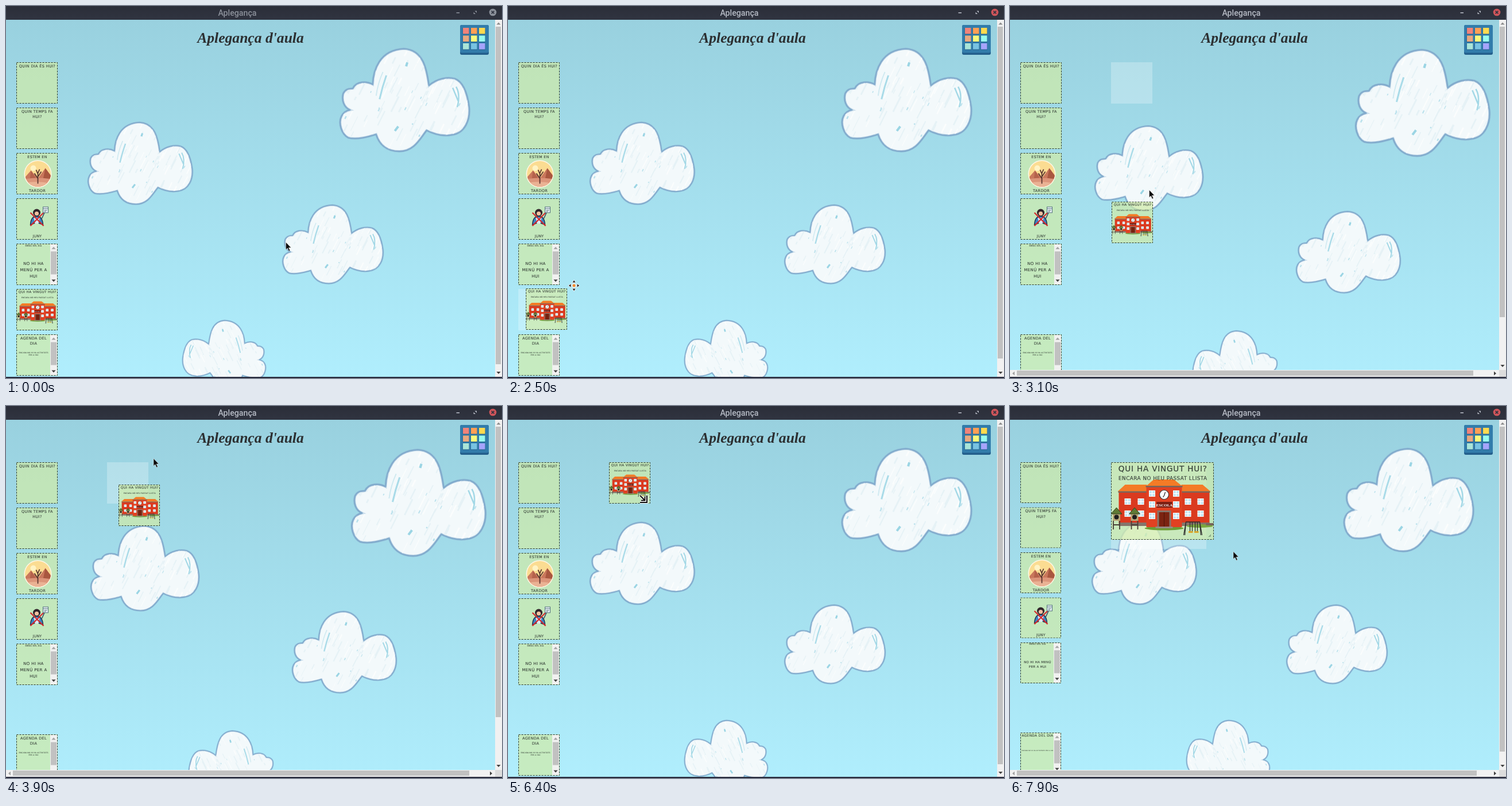
These frames come from a looping animation (864 by 648 pixels, 8000 ms). An HTML page:

```html
<!DOCTYPE html>
<html lang="ca">
<head>
<meta charset="utf-8">
<title>Aplegança</title>
<style>
html, body { margin: 0; width: 100%; height: 100%; overflow: hidden; background: #a6dfee; }
svg { display: block; }
#stage { width: 864px; height: 648px; }
.hand { font-family: "DejaVu Sans", sans-serif; letter-spacing: .06em; fill: #38423a; stroke: #38423a; text-anchor: middle; }
</style>
</head>
<body>
<svg id="stage" viewBox="0 0 864 648"></svg>
<script>
const LOOP = 8000;

// time, x, y, shape
const CURSOR = [
  [0, 487, 411, 'arrow'], [500, 455, 372, 'arrow'], [600, 400, 320, 'arrow'], [700, 330, 288, 'arrow'],
  [800, 262, 296, 'arrow'], [900, 203, 335, 'arrow'], [1000, 169, 392, 'arrow'], [1200, 160, 412, 'arrow'],
  [1300, 140, 450, 'arrow'], [1400, 108, 495, 'arrow'], [1500, 72, 528, 'move'], [1600, 44, 543, 'move'],
  [1700, 42, 541, 'move'], [2200, 64, 524, 'move'], [2300, 92, 502, 'move'], [2500, 115, 487, 'move'],
  [2700, 135, 452, 'arrow'], [2900, 180, 405, 'arrow'], [3000, 215, 362, 'arrow'], [3100, 242, 320, 'arrow'],
  [3300, 254, 255, 'arrow'], [3400, 261, 200, 'arrow'], [3600, 260, 152, 'arrow'], [3700, 259, 112, 'arrow'],
  [3900, 256.5, 91, 'arrow'], [4000, 255, 78, 'arrow'], [4100, 255, 67, 'arrow'], [4300, 255, 64, 'arrow'],
  [4400, 255, 64, 'arrow'], [4800, 246, 95, 'arrow'], [4900, 228, 130, 'arrow'], [5000, 215, 156, 'arrow'],
  [5200, 226, 177, 'arrow'], [5400, 232, 168, 'arrow'], [5500, 240, 156, 'arrow'], [5600, 246, 148, 'arrow'],
  [6400, 229, 155, 'resize'], [7400, 356, 235, 'arrow'], [7700, 382, 249, 'arrow'], [7900, 388.5, 253, 'arrow']
];
// time, x, y of the dragged card
const DRAG = [
  [0, 18, 493], [2500, 31, 492], [2700, 55, 470], [2900, 102, 428], [3000, 143, 383], [3100, 177, 341],
  [3300, 192, 298], [3400, 201, 255], [3600, 199, 205], [3700, 198, 165], [3900, 196, 137], [4000, 196, 123],
  [4100, 196, 111], [4300, 195, 107], [4400, 195, 105], [4600, 179, 99], [4800, 177, 98], [5000, 176, 98]
];
// time, card width, card height, column slot size
const SIZE = [[0, 72, 72, 72], [7400, 155, 120, 71.7], [7700, 174, 131, 71.3], [7900, 179, 135, 71]];
// time, vertical thumb end, horizontal thumb end
const BARS = [
  [0, 624, 0], [2500, 614, 0], [2700, 555, 825], [2900, 542, 807], [4600, 604, 0],
  [4800, 614, 0], [5000, 624, 0], [7400, 602, 835], [7700, 602, 817], [7900, 602, 813]
];
// time, drop hint box
const HINT = [
  [0], [2500, 18, 493, 72, 72], [2700, 97, 98, 72, 72],
  [3000, 176, 98, 72, 72], [4600], [7400, 176, 98, 166, 151]
];

const at = (rows, t) => rows.reduce((hit, row) => row[0] <= t ? row : hit);
const rect = (x, y, w, h, fill, more = '') =>
  `<rect x="${x}" y="${y}" width="${w}" height="${h}" fill="${fill}" ${more}/>`;
const path = (d, fill, more = '') => `<path d="${d}" fill="${fill}" ${more}/>`;
const circle = (x, y, r, fill, more = '') => `<circle cx="${x}" cy="${y}" r="${r}" fill="${fill}" ${more}/>`;
const line = (d, color, w = 1) => path(d, 'none', `stroke="${color}" stroke-width="${w}"`);
const hand = (str, x, y, size) =>
  `<text class="hand" x="${x}" y="${y}" font-size="${size * 0.91}" stroke-width="${size * 0.016}">${str}</text>`;

let seed = 7;
const rnd = () => (seed = seed * 16807 % 2147483647) / 2147483647;

function cloud() {
  const d = 'M57 64C58 40 68 3 112 1C146 3 152 36 156 66C170 54 188 50 202 54C218 60 224 82 227 104' +
    'C229 126 220 150 196 153C180 156 166 152 152 145C140 160 130 182 104 182C80 182 68 168 63 152' +
    'C50 156 30 162 14 158C2 152-4 132 2 120C6 112 12 110 17 109C6 104 2 92 5 80C10 70 18 72 22 71C28 58 46 58 57 64Z';
  let marks = '';
  for (let i = 0; i < 140; i++) {
    const x = rnd() * 235, y = rnd() * 175, n = 6 + rnd() * 22;
    marks += line(`M${x} ${y}l${-n * 0.5} ${n}`, i % 2 ? '#e6f2f6' : '#fbfdfd', 1 + rnd() * 2);
  }
  for (let i = 0; i < 18; i++) {
    const n = 2 + rnd() * 4;
    marks += line(`M${rnd() * 225} ${rnd() * 170}l${-n * 0.5} ${n}`, '#b9e1ec', 1 + rnd() * 1.5);
  }
  marks += line('M81 48Q74 68 69 90', '#a9dbe8', 3) + line('M75 42Q66 62 63 84', '#d0eaf1', 2) +
    line('M204 68Q212 82 206 104M198 70l10 24', '#a3d8e6', 2.5) + line('M118 25l-2 7M102 138l-6 8', '#9bd5e4', 4);
  return `<clipPath id="puff"><path d="${d}"/></clipPath><g id="cloud">` +
    path(d, '#f3f9fb', 'stroke="#8fb4d2" stroke-opacity=".4" stroke-width="4.4"') +
    `<g clip-path="url(#puff)">${marks}</g>` +
    path(d, 'none', 'stroke="#7ba5c9" stroke-opacity=".85" stroke-width="2.6" stroke-linejoin="round"') + '</g>';
}

const pane = (x, y) => rect(x, y, 11, 11, '#fff') + rect(x + 1, y + 1, 9, 9, '#bfe3f4') +
  line(`M${x + 5.5} ${y}v11M${x} ${y + 5.5}h11`, '#fff', 1.3);

function tower(x) {
  return line(`M${x + 3} 73v15M${x + 14} 73v15M${x + 3} 80h11`, '#4a4038', 1.8) +
    rect(x + 2, 60, 13, 13, '#b9a878') + circle(x + 8.5, 66.5, 4, '#1d1d1d') +
    path(`M${x - 1} 61l9.5-11l9.5 11z`, '#5f7a35', 'stroke="#33421f" stroke-width="1"');
}

function school() {
  const wing = x => rect(x, 23, 49, 54, '#da3a1f') + rect(x - 1, 21.5, 51, 2.5, '#77665c') + rect(x, 76, 49, 6, '#85756b');
  let s = path('M11 22L24 10H62V22ZM122 10H159L173 22H122Z', '#f47b26') + wing(13) + wing(122);
  s += '<ellipse cx="92" cy="86" rx="34" ry="3.5" fill="#6c9c35"/><ellipse cx="154" cy="82" rx="23" ry="3" fill="#7aa83f"/>';
  s += rect(61, 13, 62, 71, '#e14122') + path('M60 13L74 1H109L124 13Z', '#f47b26') + rect(60, 12, 64, 2.5, '#77665c');
  for (const y of [34, 55]) for (const x of [23, 46, 128, 150]) s += pane(x, y);
  for (const y of [20, 39, 59]) s += pane(65.5, y) + pane(107.5, y);
  s += circle(92, 27.5, 8, '#fff', 'stroke="#3a3a3a" stroke-width="1.2"') + line('M92 29l2-6M92 29l-2 3', '#222', 1.2);
  s += rect(79, 40, 27, 10, '#7a1e12') +
    '<text x="92.5" y="47.8" font-family="Liberation Serif, serif" font-weight="700" font-size="7" text-anchor="middle" fill="#fff">ESCOLA</text>';
  s += rect(80, 55, 24, 30, '#85756b') + rect(83, 58, 18, 26, '#7b2411') + line('M92 58v26', '#4c1409') + rect(77, 83, 30, 3, '#968a82');
  s += tower(0.5) + tower(32) + rect(165, 77, 13, 4, '#77665c');
  s += line('M126 98l4-23h24l4 23M130 75l-2 23M154 75l2 23M137 75v17M141 75v17M146 75v17M150 75v17', '#2e2e2e', 1.3) +
    rect(134.5, 91, 7.5, 3, '#d9a72b') + rect(144.5, 91, 7.5, 3, '#d9a72b');
  return `<g id="school">${s}</g>`;
}

const autumn = '<g id="autumn"><clipPath id="disc"><circle r="22.5"/></clipPath>' + circle(0, 0, 24, '#fff7e6') +
  '<g clip-path="url(#disc)">' + rect(-24, -24, 48, 48, '#fbdc92') + circle(-8, -10, 5, '#fff3c4') +
  path('M-26 10L-12-6L0 8L13-10L28 10Z', '#c9775c') + path('M13-10L28 10H9Z', '#a9573f') + path('M-12-6L-2 10H-14Z', '#b5624c') +
  path('M-24 9Q0 5 24 9V24H-24Z', '#dc957a') + path('M-24 16Q0 11 24 17V24H-24Z', '#eab294') + '</g>' +
  line('M0 17V-3M0 8L-6-1M0 5L6-4M0 0L-3-7M0-1L3-8', '#5b3630', 1.8) + '</g>';

const pupil = '<g id="pupil">' + circle(0, -8, 6.5, '#31242a') + circle(0, -6.5, 3.6, '#f0c0a0') +
  path('M-11 13Q-10-2 0-2Q10-2 11 13L0 9Z', '#3d83c4', 'stroke="#1c2f47" stroke-width="1.4"') + path('M-5 1H5L3 11H-3Z', '#dce9f2') +
  line('M-11-8L12 15M12-8L-11 15', '#d4282c', 2.2) + line('M9 2L14-9', '#35506b', 1.6) +
  rect(11, -18, 9, 10, '#e8f2f5', 'stroke="#52717c" stroke-width="1"') + line('M11-15h9M13-12h5M13-10h3', '#52717c', 1.2) + '</g>';

const cursors = {
  arrow: path('M.5 .5V13.5L3.4 10.8L5.7 16L7.8 15.1L5.5 10H9.6Z', '#0c0c0c', 'stroke="#fff" stroke-opacity=".8" stroke-width=".6"'),
  move: ['0', '90', '180', '270'].map(a =>
    path('M0-10L3.4-5H-3.4Z', '#2b2b2b', `stroke="#fff" stroke-width=".9" transform="rotate(${a})"`)).join('') +
    circle(0, 0, 3.2, '#f08a30', 'stroke="#fff" stroke-width="1"'),
  resize: [['#fff', 3.8], ['#0c0c0c', 2]].map(([c, w]) => line('M1 13H13V1M1 1L9 9M9.5 3V9.5H3', c, w)).join('')
};

const tri = (x, y, dir, fill) => path('M0-2L3.6 2H-3.6Z', fill, `transform="translate(${x} ${y}) rotate(${dir})"`);

function card(x, y, w, h, body, grip) {
  const edge = grip ? line(`M${w - 9} ${h - 5}l4-4M${w - 7} ${h - 5}l2-2`, '#58705a', 0.9) : '';
  return `<svg x="${x}" y="${y}" width="${w}" height="${h}">` + rect(0, 0, w, h, '#d0eca7', 'fill-opacity=".7"') +
    `<g transform="translate(.5 .5)">${body}</g>` + edge +
    rect(0.5, 0.5, w - 1, h - 1, 'none', 'stroke="#2d3a2d" stroke-dasharray="3 2"') + '</svg>';
}

const innerBar = s => rect(s - 13.5, 0.5, 12, s - 2, '#f1f1f1') + rect(s - 12.5, 13, 10, 40, '#c1c1c1') +
  tri(s - 7.5, 7, 0, '#a3a3a3') + tri(s - 7.5, s - 8, 180, '#404040');

function column(s) {
  const small = s < 72, m = s / 2, pitch = 79 - (72 - s) / 2, f = 7.1;
  const bodies = [
    hand('QUIN DIA ÉS HUI?', m, 8.3, f),
    hand('QUIN TEMPS FA', m, 8.3, f) + hand('HUI?', m, 17.5, f),
    hand('ESTEM EN', m, 8.2, 6.8) + '<use href="#autumn" x="37" y="36"/>' + hand('TARDOR', m, 67.5, f),
    `<use href="#pupil" x="35" y="${small ? 31 : 32.5}"/>` + hand('JUNY', m, 67, 6.6),
    hand('MENÚ DEL DIA', 29.5, small ? 3 : 4, 4) + (small
      ? hand('NO HI HA MENÚ', 29.5, 35, 6) + hand('PER A HUI', 29.5, 43.5, 6)
      : hand('NO HI HA', 29.5, 36.5, 7.6) + hand('MENÚ PER A', 29.5, 47.5, 7.6) + hand('HUI', 29.5, 58.5, 7.6)) + innerBar(s),
    null,
    (small
      ? hand('AGENDA DEL DIA', 29.5, 6.8, 6.4) + hand('ENCARA NO HI HA ACTIVITATS PER A HUI', 29.5, 31.5, 2.7)
      : hand('AGENDA DEL', 29.5, 8, f) + hand('DIA', 29.5, 17.3, f) +
        hand('ENCARA NO HI HA ACTIVITATS', 29.5, 32.5, 3.4) + hand('PER A HUI', 29.5, 36.5, 3.4)) + innerBar(s)
  ];
  return bodies.map((b, i) => b ? card(18, 98 + i * pitch, s, s, b) : '').join('');
}

function schoolCard(t) {
  const [, x, y] = at(DRAG, t), [, w, h] = at(SIZE, t);
  const k = (w - 72) / 107, mix = (a, b) => a + (b - a) * k;
  const body = `<use href="#school" transform="translate(0 ${mix(20.5, 28.5)}) scale(${(w - 1) / 178})"/>` +
    hand('QUI HA VINGUT HUI?', w / 2 + 0.3, mix(6.8, 15.3), mix(6.35, 14.9)) +
    hand('ENCARA NO HEU PASSAT LLISTA', w / 2 + 0.3, mix(15, 30.2), mix(3.5, 9.65));
  return card(x, y, w, h, body, (t >= 1900 && t < 2500) || t >= 5400);
}

function bars(t) {
  const [, v, h] = at(BARS, t), end = h ? 634 : 646;
  let s = rect(852, 24, 12, end - 24, '#f1f1f1') + rect(853, 36, 9, v - 36, '#c1c1c1') +
    tri(858, 30.5, 0, '#8c8c8c') + tri(858, end - 7, 180, '#404040');
  if (h) s += rect(0, 634, 852, 12, '#f1f1f1') + rect(852, 634, 12, 12, '#dcdcdc') + rect(12, 635, h - 12, 9, '#c1c1c1') +
    tri(6, 640, -90, '#a3a3a3') + tri(845, 640, 90, '#404040');
  return s;
}

function frame(t) {
  const on = t >= 2200, ink = on ? '#b5bac4' : '#8b909a';
  return rect(0, 0, 864, 24, 'url(#bar)') + rect(0, 646, 864, 2, '#25283a') +
    `<text x="403" y="17" font-family="Roboto, sans-serif" font-weight="500" font-size="14.2" text-anchor="middle" fill="${ink}">Aplegança</text>` +
    rect(784.5, 11, 5.5, 1.6, ink) + path('M816.5 8.5H820V12ZM814.5 10.5V14H818Z', ink) +
    circle(848, 11, 6.3, on ? '#d0555a' : '#8b909a') + line('M845.6 8.6l4.8 4.8M850.4 8.6l-4.8 4.8', '#2f3340', 1.5);
}

function button() {
  const tones = ['#f0837a', '#ff9f55', '#ffda4f', '#e8a87f', '#f8f97c', '#97fbef', '#a9e4d8', '#78c3e2', '#a6a4fb'];
  return rect(791, 33, 50, 52, '#245f8c', 'rx="3"') + rect(791, 33, 50, 48.5, '#327cab', 'rx="3"') +
    tones.map((c, i) => {
      const x = 796 + i % 3 * 14, y = 38 + Math.floor(i / 3) * 13.5;
      return rect(x - 0.5, y, 11.5, 11.5, '#24608c') + rect(x, y, 10.5, 10.5, c);
    }).join('');
}

const puff = (x, y, sx, sy) => `<use href="#cloud" transform="translate(${x} ${y}) scale(${sx} ${sy})"/>`;
const stage = document.getElementById('stage');
stage.innerHTML = '<defs>' +
  '<linearGradient id="sky" x2="0" y2="1"><stop stop-color="#99d1df"/><stop offset="1" stop-color="#b0eefd"/></linearGradient>' +
  '<linearGradient id="bar" x2="0" y2="1"><stop stop-color="#2b2e39"/><stop offset="1" stop-color="#303440"/></linearGradient>' +
  cloud() + school() + autumn + pupil + '</defs>' +
  '<g id="back">' + rect(0, 24, 864, 624, 'url(#sky)') + puff(582.5, 73.5, 0.988, 0.987) + puff(143.5, 202, 0.797, 0.787) +
  puff(482.5, 346, 0.767, 0.755) + puff(452, 547, -0.635, 0.635) + '</g>' +
  '<text x="426" y="64" font-family="Liberation Serif, serif" font-weight="700" font-style="italic" font-size="25.6" text-anchor="middle" fill="#2c2f31">Aplegança d\'aula</text>' +
  button() + '<g id="live"></g>';
const back = document.getElementById('back'), live = document.getElementById('live');

function draw(t) {
  const [, hx, hy, hw, hh] = at(HINT, t), [, cx, cy, shape] = at(CURSOR, t);
  const zoomed = t >= 2700 && t < 4600;
  back.setAttribute('transform', zoomed ? 'translate(0 24) scale(1.035) translate(0 -24)' : '');
  live.innerHTML = (hw ? rect(hx, hy, hw, hh, '#fff', 'fill-opacity=".25"') : '') +
    column(at(SIZE, t)[3]) + schoolCard(t) + bars(t) + frame(t) +
    `<g transform="translate(${cx} ${cy})">${cursors[shape]}</g>`;
}

let last = -1;
function tick() {
  const step = Math.floor(performance.now() % LOOP / 100) * 100;
  if (step !== last) draw(last = step);
  requestAnimationFrame(tick);
}
tick();
</script>
</body>
</html>
```
